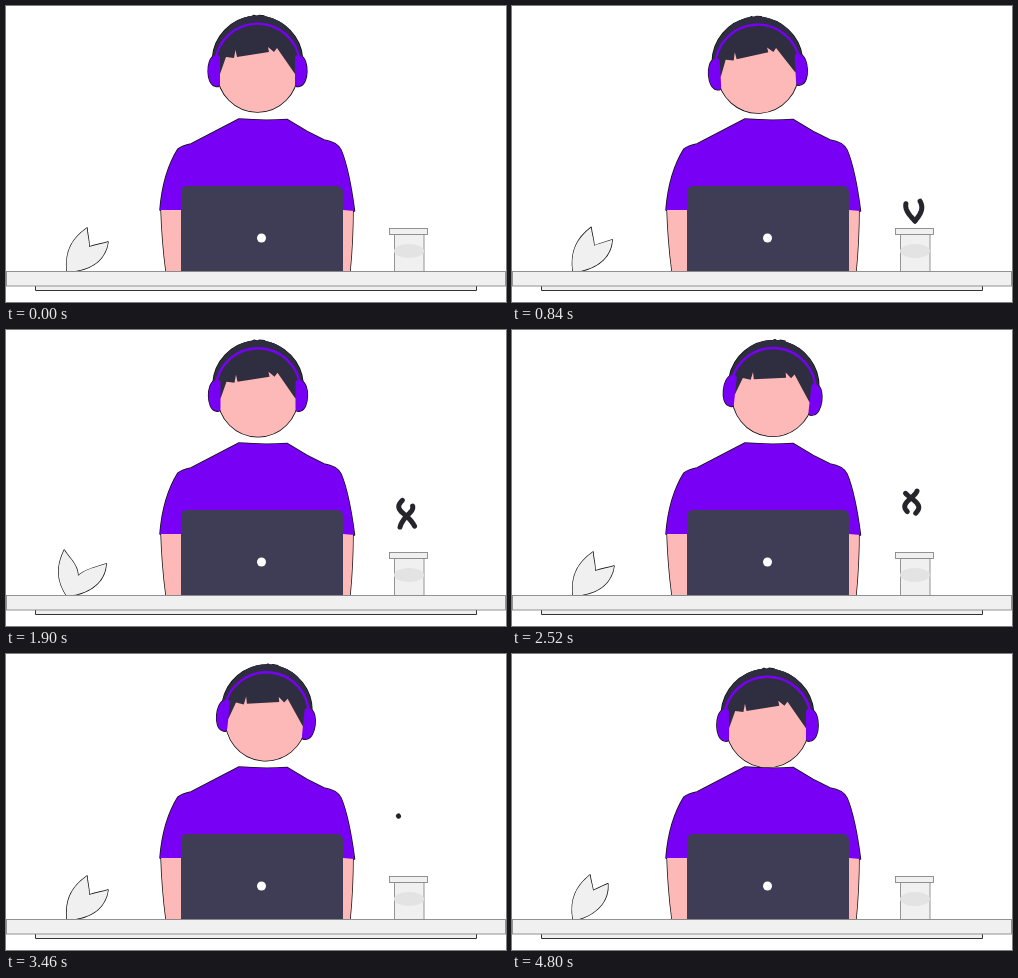
Recreate the animation shown at these times as an HTML page. Size 500 by 296 pixels, loop 4.82 s.

```html
<!DOCTYPE html>
<html lang="en">
<head>
<meta charset="utf-8">
<title>Working at a laptop</title>
<style>
html, body { margin: 0; width: 100%; height: 100%; overflow: hidden; background: #fff; }
svg { display: block; width: 500px; height: 296px; }
.skin { fill: #fdb8b8; }
.hair { fill: #2f2e41; }
.purple { fill: #7800f5; }
.pale { fill: #f0f0f0; }
.edge { stroke: #111; stroke-width: 1.5; stroke-linejoin: round; }
.line { stroke: #888; stroke-width: .9; }
</style>
</head>
<body>
<svg viewBox="0 0 500 296">
  <!-- Outlined copy below, plain copy above: only the outer contour shows -->
  <g class="edge">
    <g id="scene">
      <g class="pale">
        <path id="leftLeaf" d="M61 265C59 244 67 232 81 222C81 234 91 248 68 265Z"/>
        <path id="rightLeaf" d="M63 265C70 240 84 241 102 236C100 252 88 262 70 265Z"/>
      </g>
      <path class="skin" d="M155 202Q156 235 160 265H176V202ZM336 202H347Q347 235 344 265H336Z"/>
      <path class="purple" d="M233 113Q257 115 281 113.500L301 125.500L318 134Q331 136 335 144Q343 163 348.500 205L337 204H175L154 204Q157 167 172 143Q176 140 185 138Z"/>
      <g id="head">
        <path class="hair" d="M214 68Q206 60 206.500 52A45.200 45.200 0 0 1 246 10.500L248 9.500L251 11L253 9.500L258 10L257 11A45.200 45.200 0 0 1 296.500 52Q297 62 290 69Z"/>
        <circle class="skin" cx="251.500" cy="66" r="40"/>
        <path class="hair" stroke="none" d="M214 68L209 52A42.500 42.500 0 0 1 294 52L289 68L271 42L268 46L262 41L263 46L231 51L229.500 44L228 52L220 51Z"/>
        <path d="M209.200 56A42.500 42.500 0 0 1 293.800 56" fill="none" stroke="#7800f5" stroke-width="2.400"/>
        <path class="purple" d="M208 50Q214 47 214 53V77Q214 82 209 80C200 78 200 53 208 50ZM295 50Q289 47 289 53V77Q289 82 294 80C303 78 303 53 295 50Z"/>
      </g>
    </g>
  </g>
  <use href="#scene"/>
  <rect x="175" y="180" width="162" height="92" rx="6" fill="#3f3d56"/>
  <circle cx="255.500" cy="232" r="4.500" fill="#fff"/>
  <path class="pale line" d="M388.500 228H418V266H388.500Z"/>
  <ellipse cx="403" cy="245" rx="15" ry="7" fill="#e3e3e3"/>
  <rect class="pale line" x="383.500" y="222.500" width="38" height="6"/>
  <rect class="pale" x="29.500" y="279" width="441" height="5.500"/>
  <path d="M29.500 280V284.500H470.500V280" fill="none" stroke="#333"/>
  <rect class="pale line" x=".5" y="265.500" width="499" height="14.500"/>
  <g fill="none" stroke="#25252b" stroke-width="5" stroke-linecap="round" stroke-linejoin="round">
    <path id="steamA"/>
    <path id="steamB"/>
  </g>
</svg>
<script>
const LOOP = 4820;
const el = id => document.getElementById(id);

// Rows of [time, ...values]; the head has x, y, angle and scale
const headKeys = [
  [0, 0, 0, 0, 1], [840, -5.5, 1, -3.3, 1], [1900, .5, .7, 0, 1], [2520, 9, .3, 6.3, 1],
  [3460, 8.3, .7, 5.8, 1], [3920, 4.5, 6, 0, 1.03], [LOOP, 4, 6.3, 0, 1.025]
];
const leftKeys = [[0, 0], [600, 0], [840, -2.5], [1900, -29], [2500, 0], [4400, 0], [LOOP, -4]];
const rightKeys = [[0, 0], [600, 0], [840, -3.5], [1900, -3.5], [2500, 0], [4300, 0], [LOOP, -11]];

function sample(keys, t) {
  const i = keys.findIndex(k => k[0] > t);
  const a = keys[i - 1], b = keys[i];
  const u = (t - a[0]) / (b[0] - a[0]);
  const s = u * u * (3 - 2 * u);
  return a.slice(1).map((v, j) => v + (b[j + 1] - v) * s);
}

// x of a strand of steam: both start together and cross on the way up
function strandX(y, side) {
  const wave = y > 186
    ? 8 * Math.sin((215 - y) / 29 * Math.PI)
    : -7 * Math.sin((186 - y) / 18 * Math.PI);
  return 403 - (215 - y) * .085 + side * wave;
}

function drawSteam(id, t, side, end, headSpeed, tailSpeed) {
  const top = Math.max(end, 215 - t * headSpeed);
  const bottom = Math.min(215, 215 - (t - 1100) * tailSpeed);
  let d = "";
  if (t > 60 && bottom >= top) {
    for (let y = bottom; y > top; y--) d += `${d ? "L" : "M"}${strandX(y, side)} ${y}`;
    d += `${d ? "L" : "M"}${strandX(top, side)} ${top}`;
  }
  el(id).setAttribute("d", d);
}

function frame(now) {
  const t = now % LOOP;
  const [x, y, angle, scale] = sample(headKeys, t);
  el("head").setAttribute("transform",
    `translate(${251.5 + x} ${66 + y}) rotate(${angle}) scale(${scale}) translate(-251.5 -66)`);
  el("leftLeaf").setAttribute("transform", `rotate(${sample(leftKeys, t)} 66 265)`);
  el("rightLeaf").setAttribute("transform", `rotate(${sample(rightKeys, t)} 66 265)`);
  drawSteam("steamA", t, 1, 161, .0235, .0235);
  drawSteam("steamB", t, -1, 162, .0205, .0224);
  requestAnimationFrame(frame);
}
frame(0);
</script>
</body>
</html>
```
